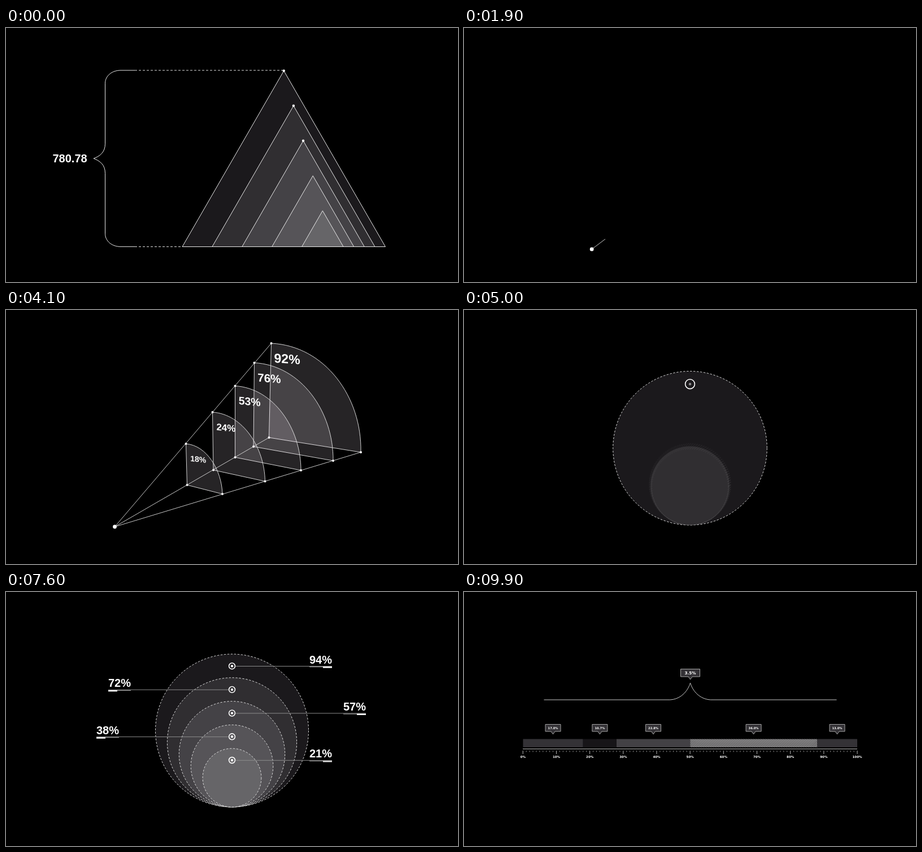
An HTML page with a canvas for the animation above (10000 ms loop, 800 by 450 pixels).

```html
<!DOCTYPE html>
<html lang="en">
<head>
<meta charset="utf-8">
<title>Infographic charts</title>
<style>
html, body { margin: 0; width: 100%; height: 100%; overflow: hidden; background: #000; }
canvas { display: block; }
</style>
</head>
<body>
<canvas id="stage" width="800" height="450"></canvas>
<script>
const g = document.getElementById('stage').getContext('2d');
const SHADES = ['#1b191c', '#302e31', '#444246', '#565458', '#666568'];
const BOLD = 'Liberation Sans, Arial, sans-serif';
const SMALL = 'DejaVu Sans, sans-serif';

// Progress from 0 to 1 of a move that starts at `start` and lasts `length`
const span = (t, start, length) => Math.min(1, Math.max(0, (t - start) / length));
const easeOut = p => 1 - (1 - p) ** 3;
const easeBoth = p => p < .5 ? 2 * p * p : 1 - 2 * (1 - p) ** 2;
const easeBothCubic = p => p < .5 ? 4 * p ** 3 : 1 - 4 * (1 - p) ** 3;
const easeBack = p => 1 + 1.5 * (p - 1) ** 3 + .5 * (p - 1) ** 2;

function stroke(color = '#e8e8e8', width = 1, dash = []) {
  g.strokeStyle = color;
  g.lineWidth = width;
  g.setLineDash(dash);
  g.stroke();
  g.setLineDash([]);
}

function line(x1, y1, x2, y2, color, width, dash) {
  g.beginPath();
  g.moveTo(x1, y1);
  g.lineTo(x2, y2);
  stroke(color, width, dash);
}

function circle(x, y, r) {
  g.beginPath();
  g.arc(x, y, Math.max(0, r), 0, 7);
}

function dot(x, y, r, color = '#fff') {
  circle(x, y, r);
  g.fillStyle = color;
  g.fill();
}

function label(text, x, y, font, align = 'center', color = '#fff') {
  g.font = font;
  g.textAlign = align;
  g.fillStyle = color;
  g.fillText(text, x, y);
}

function faded(alpha, draw) {
  g.save();
  g.globalAlpha *= alpha;
  draw();
  g.restore();
}

// Nested triangles with a height bracket
function triangles(t) {
  const tips = SHADES.map((shade, i) => {
    const left = 312 + 52.9 * i, right = 671.5 - 18.6 * i;
    const x = (left + right) / 2, y = 387.5 - .867 * (right - left);
    g.beginPath();
    g.moveTo(left, 387.5);
    g.lineTo(x, y);
    g.lineTo(right, 387.5);
    g.closePath();
    g.fillStyle = shade;
    g.fill();
    stroke();
    return [x, y];
  });
  tips.forEach(([x, y], i) => {
    const start = -310 + 105 * i;
    const p = span(t, start, 150);
    if (p) dot(x, y, 2.2 * easeBack(p));
    const reach = easeBoth(span(t, start + 400, 400));
    if (reach) line(x + 3, y, x + 3 + (681 - x) * reach, y, '#8a8a8a');
    faded(span(t, start + 650, 250), () =>
      label(100 - 20 * i + '%', 684, y - 4, `bold 15px ${BOLD}`, 'right'));
  });

  line(228, 75, 490, 75, '#ddd', 1, [4, 3]);
  line(228, 387.5, 312, 387.5, '#ddd', 1, [4, 3]);
  g.beginPath();
  for (const s of [-1, 1]) {
    const y = d => 231.2 + s * d;
    g.moveTo(228, y(156.2));
    g.lineTo(203, y(156.2));
    g.bezierCurveTo(187, y(156.2), 175.5, y(146), 175.5, y(133));
    g.lineTo(175.5, y(26));
    g.bezierCurveTo(175.5, y(11), 166, y(4), 155, y(0));
  }
  stroke();
  const value = 780.78 + 70 * easeOut(span(t, 0, 500));
  label(value.toFixed(2), 82.5, 238, `bold 20px ${BOLD}`, 'left');
}

// Cone of quarter discs under a slowly turning camera
const APEX = [192.5, 384];
const SECTORS = [
  { top: [318.5, 237], mid: [320.5, 310], end: [383, 326], value: 18, size: 14 },
  { top: [365.5, 181], mid: [367, 283.5], end: [458.5, 303.5], value: 24, size: 17 },
  { top: [405.5, 134.5], mid: [405.5, 261], end: [522, 284], value: 53, size: 19.5 },
  { top: [439.5, 93.5], mid: [438, 242], end: [579, 267], value: 76, size: 20.5 },
  { top: [469.5, 59], mid: [465.5, 226], end: [628, 252], value: 92, size: 23 }
];

function cone(t) {
  const d = (t - 4100) / 1000;
  const turn = ([x, y]) => {
    const dx = x - APEX[0], dy = y - APEX[1];
    return [x + d * (.0541 * dx - 15.3), y + d * (.0642 * dx + .0436 * dy - 3.6)];
  };
  const apex = turn(APEX), far = SECTORS[4];
  const ray = (to, p) => {
    const [x, y] = turn(to);
    line(...apex, apex[0] + (x - apex[0]) * p, apex[1] + (y - apex[1]) * p, '#ddd', .9);
  };

  for (let i = 4; i >= 0; i--) {
    const s = SECTORS[i], p = easeOut(span(t, 2100 + 150 * i, 500));
    if (!p) continue;
    const [cx, cy] = turn(s.mid), top = turn(s.top), end = turn(s.end);
    const ux = (top[0] - cx) * p, uy = (top[1] - cy) * p;
    const vx = (end[0] - cx) * p, vy = (end[1] - cy) * p;
    // Perspective flattens the slope at the top and swells the arc
    const k = .585, flat = .3;
    g.beginPath();
    g.moveTo(cx, cy);
    g.lineTo(cx + ux, cy + uy);
    g.bezierCurveTo(cx + ux + k * vx, cy + uy + k * flat * vy,
      cx + vx + k * ux, cy + vy + k * uy, cx + vx, cy + vy);
    g.closePath();
    g.fillStyle = 'rgba(250,242,252,.15)';
    g.fill();
    stroke('#e8e8e8', .9);
    dot(cx, cy, 2);
    dot(cx + ux, cy + uy, 2);
    dot(cx + vx, cy + vy, 2);
  }
  ray(far.mid, easeBoth(span(t, 1800, 450)));
  const outer = easeBoth(span(t, 2250, 650));
  if (outer) {
    ray(far.top, outer);
    ray(far.end, outer);
  }
  dot(...apex, 3.4);

  SECTORS.forEach((s, i) => {
    const p = span(t, 2350 + 150 * i, 450);
    if (!p) return;
    const [x, y] = turn([s.top[0] + 12 + .7 * s.size, s.top[1] + 27.3]);
    const mid = turn(s.mid), end = turn(s.end);
    faded(Math.min(1, 2 * p), () => {
      g.transform(1, .45 * (end[1] - mid[1]) / (end[0] - mid[0]), 0, 1, x, y);
      label(Math.round(s.value * easeOut(p)) + '%', 0, .36 * s.size, `bold ${s.size}px ${BOLD}`);
    });
  });
}

// Nested dashed circles with callouts; x is the outer end of each line
const CALLOUTS = [
  { x: 577, value: 94 }, { x: 181, value: 72 }, { x: 637, value: 57 },
  { x: 160, value: 38 }, { x: 577, value: 21 }
];

function circles(t) {
  SHADES.forEach((shade, i) => {
    const p = span(t, 4500 + 340 * i, 700);
    if (!p) return;
    const r = (135.5 - 20.9 * i) * Math.max(0, easeBack(p));
    dot(400, 381 - r, r, shade);
    if (p < .45) {
      // Smeared outline while the circle grows fast
      for (let j = -4; j < 5; j++) {
        circle(400, 381 - r - j * .6, r + j * .6);
        stroke('rgba(225,225,225,.06)', 1, [2, 2]);
      }
    } else {
      circle(400, 381 - r, r);
      stroke('#dcdcdc', 1, [3.5, 2.5]);
    }
  });

  CALLOUTS.forEach(({ x, value }, i) => {
    const age = t - 4800 - 340 * i, y = 131.2 + 41.7 * i;
    if (age < 0) return;
    const p = span(age, 0, 400), side = x > 400 ? 1 : -1;
    faded(Math.min(1, 2 * p), () => {
      circle(400, y, 5.4 + 24 * (1 - p) ** 3);
      stroke('#fff', 1.6);
    });
    faded(p, () => dot(400, y, 2.2));

    const start = 400 + 6 * side, reach = easeBoth(span(age, 530, 450));
    if (reach) line(start, y + .3, start + (x - start) * reach, y + .3, '#8c8c8c');
    faded(span(age, 750, 250), () =>
      label(value + '%', x, y - 4.7, `bold 20px ${BOLD}`, side > 0 ? 'right' : 'left'));
    faded(span(age, 1170, 330), () => {
      g.fillStyle = '#aaa';
      g.fillRect(side > 0 ? x - 40 : x, y + 1, 40, 1);
      g.fillStyle = '#fff';
      g.fillRect(side > 0 ? x - 16 : x, y + 1, 16, 2.4);
    });
  });
}

// Segmented percentage bar
const SEGMENTS = [
  { from: 0, to: 18, value: 17, color: '#343236', start: 8490 },
  { from: 18, to: 28, value: 10.7, color: '#171518', start: 8620 },
  { from: 28, to: 50, value: 22.8, color: '#434145', start: 8600 },
  { from: 50, to: 88, value: 36, color: '#1b191c', start: 8450, hatched: true },
  { from: 88, to: 100, value: 13, color: '#343236', start: 8480 }
];
const scaleX = percent => 104.3 + 5.917 * percent;

function tag(x, tip, w, h, value, font, p) {
  if (!p) return;
  const y = -5 - h;
  faded(Math.min(1, 2 * p), () => {
    g.translate(x, tip);
    g.scale(easeBack(p), easeBack(p));
    g.beginPath();
    [[-w, y], [w, y], [w, -5], [3.5, -5], [0, 0], [-3.5, -5], [-w, -5]]
      .forEach(point => g.lineTo(...point));
    g.closePath();
    g.fillStyle = '#343236';
    g.fill();
    stroke('#a5a5a5', 1);
    label(value.toFixed(1) + '%', 0, y + h / 2 + font * .37, `bold ${font}px ${SMALL}`);
  });
}

function bar(t) {
  const half = 296 * easeOut(span(t, 8300, 530));
  line(400 - half, 278, 400 + half, 278, '#c8c8c8', 1.2);
  faded(span(t, 8300, 200), () => {
    for (let i = 0; i <= 100; i++) {
      const x = scaleX(i);
      line(x, 281, x, i % 10 ? 283.5 : 287, i % 10 ? '#999' : '#ccc', .9);
    }
  });
  for (let i = 0; i <= 10; i++) {
    const p = span(t, 8313 + 68 * i, 500);
    if (p) label(10 * i + '%', scaleX(10 * i), 294.3 + 26 * (1 - p) ** 3, `bold 5.5px ${SMALL}`);
  }

  SEGMENTS.forEach((s, i) => {
    const x = scaleX((s.from + s.to) / 2);
    const w = 5.917 * (s.to - s.from) * easeBothCubic(span(t, s.start, 800));
    if (w) {
      g.save();
      g.beginPath();
      g.rect(x - w / 2, 260.5, w, 14.5);
      g.clip();
      g.fillStyle = s.color;
      g.fillRect(x - w / 2, 260, w, 16);
      if (s.hatched) {
        for (let h = 380; h < 630; h += 3) line(h, 276, h + 16, 260, '#ccc', 1.1);
      }
      g.restore();
    }
    tag(x, 252, 13.5, 12.5, s.value * easeOut(span(t, 9050 + 60 * i, 600)), 5.2,
      span(t, 9000 + 60 * i, 300));
  });

  const reach = 296 * easeOut(span(t, 9500, 800));
  if (reach) {
    g.save();
    g.beginPath();
    g.rect(400.5 - reach, 150, 2 * reach, 50);
    g.clip();
    g.beginPath();
    for (const s of [-1, 1]) {
      const x = d => 400.5 + s * d;
      g.moveTo(x(0), 161);
      g.bezierCurveTo(x(4.5), 176, x(17), 190, x(36), 191);
      g.lineTo(x(296), 191);
    }
    stroke('#c8c8c8', 1);
    g.restore();
  }
  tag(400.5, 155, 17, 13.5, 3.5 * span(t, 9600, 300), 7.2, span(t, 9550, 300));
}

function frame(now) {
  // The picture advances ten times a second
  const t = Math.floor((now + 1) / 100) * 100 % 10000;
  g.fillStyle = '#000';
  g.fillRect(0, 0, 800, 450);
  const scene = t < 1800 ? triangles : t < 4500 ? cone : t < 8300 ? circles : bar;
  scene(t);
  requestAnimationFrame(frame);
}
requestAnimationFrame(frame);
</script>
</body>
</html>
```
